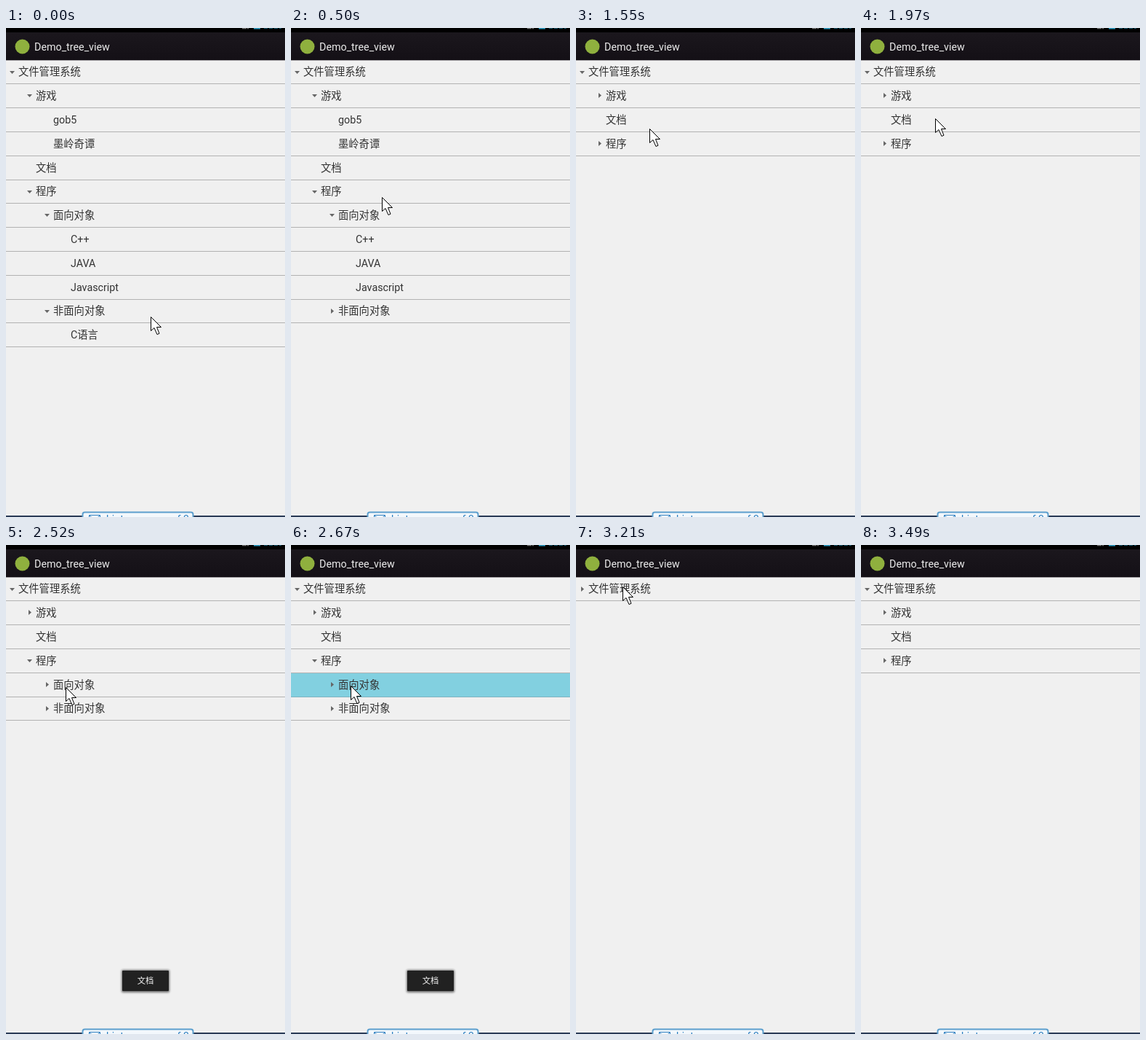
These frames come from a looping animation (384x671 px, 3890 ms). An HTML page:

```html
<!DOCTYPE html>
<html lang="zh-CN">
<head>
<meta charset="utf-8">
<title>Tree view</title>
<style>
html, body { margin: 0; height: 100%; overflow: hidden; background: #f0f0f0; }
svg { display: block; width: 100vw; height: 100vh; }
text { font: 14.3px Roboto, "Noto Sans CJK SC", "Noto Sans CJK", sans-serif; fill: #333; }
</style>
</head>
<body>
<svg viewBox="0 0 384 671">
  <defs>
    <linearGradient id="bar" x2="0" y2="1">
      <stop stop-color="#1b171d"/><stop offset="1" stop-color="#141016"/>
    </linearGradient>
    <filter id="blur"><feGaussianBlur stdDeviation="1.5"/></filter>
  </defs>
  <rect width="384" height="671" fill="#f0f0f0"/>
  <rect width="384" height="7" fill="#000"/>
  <rect y="6" width="384" height="38" fill="url(#bar)"/>
  <rect y="44" width="384" height="1" fill="#a9a7aa"/>
  <path d="M325 .5h9" stroke="#777" stroke-width="1.5" stroke-dasharray="6 1"/>
  <path d="M341 0h9" stroke="#2a9cc4" stroke-width="3"/>
  <path d="M355 .3h24" stroke="#1b6f8e" stroke-dasharray="5 2"/>
  <circle cx="22.5" cy="25.5" r="10" fill="#8fb03e"/>
  <text x="39" y="31" style="fill:#ececec">Demo_tree_view</text>

  <g id="rows"></g>

  <rect y="669" width="384" height="2" fill="#2b3c58"/>
  <rect x="105.5" y="664.5" width="152" height="12" rx="3" fill="#f3f8fc" stroke="#5d9fce" stroke-width="2"/>
  <path d="M114.5 680V668.5H129.5V680M115 669l7 6 7-6" fill="none" stroke="#2e7fc0"/>
  <text x="138" y="679" style="fill:#2e7fc0">hint message of 3</text>

  <g id="toast">
    <rect x="159" y="583" width="66" height="31" rx="2" opacity=".55" filter="url(#blur)"/>
    <rect x="160" y="584" width="64" height="28" rx="1" fill="#212121"/>
    <text x="192" y="602" text-anchor="middle" style="font-size:11.3px;fill:#f4f4f4">文档</text>
  </g>
  <path id="cursor" d="M.5.5V19.5L5 15.5L9 24.5L12 23.2L8.5 14.5H14.5Z" fill="#fff" stroke="#000"/>
</svg>
<script>
const LOOP = 3890, ROW = 32.8, TOP = 44;
const $ = id => document.getElementById(id);

// [level, label]
const tree = [
  [0, "文件管理系统"], [1, "游戏"], [2, "gob5"], [2, "墨岭奇谭"], [1, "文档"],
  [1, "程序"], [2, "面向对象"], [3, "C++"], [3, "JAVA"], [3, "Javascript"],
  [2, "非面向对象"], [3, "C语言"]
];

// [press time, toggle time, node]
const clicks = [
  [200, 300, 10], [700, 780, 5], [1230, 1390, 1], [1850, 1940, 4], [2300, 2400, 5],
  [2620, 2674, 6], [2990, 3090, 5], [3140, 3190, 0], [3290, 3340, 0]
];

// [time, x, y]
const path = [
  [0, 199, 396], [100, 198, 391], [300, 192, 384], [500, 125, 232], [600, 121, 224],
  [860, 117, 220], [1030, 98, 115], [1130, 96, 98], [1390, 96, 96], [1550, 101, 138],
  [1650, 102, 128], [1940, 102, 124], [2210, 92, 156], [2400, 90, 158], [2520, 82, 195],
  [2674, 82, 192], [2782, 72, 150], [2890, 66, 84], [2990, 65, 68], [3140, 64, 57],
  [3440, 64, 57]
];

const steps = [
  [0, 600, 7], [700, 1030, 5], [1130, 1130, 1], [1230, 1550, 5], [1650, 1750, 2],
  [1850, 2300, 6], [2400, 2520, 3], [2620, 2890, 6], [2990, 2990, 1], [3090, 3490, 9]
].flatMap(([a, b, n]) =>
  Array.from({ length: n }, (_, i) => n > 1 ? Math.round(a + (b - a) * i / (n - 1)) : a));

const clamp = v => Math.max(0, Math.min(1, v));

function cursorAt(t) {
  const i = Math.max(1, path.findIndex(p => p[0] >= t));
  const [a, b] = [path[i - 1], path[i]];
  const k = (t - a[0]) / (b[0] - a[0]);
  return [1, 2].map(j => Math.round(a[j] + (b[j] - a[j]) * k));
}

function closedAt(t) {
  const closed = new Set();
  for (const [, at, node] of clicks) {
    if (at > t) break;
    if (closed.delete(node)) continue;
    // Closing a node closes everything below it
    closed.add(node);
    for (let i = node + 1; i < tree.length && tree[i][0] > tree[node][0]; i++) closed.add(i);
  }
  return closed;
}

function rowsAt(t) {
  const closed = closedAt(t);
  const pressed = clicks.find(([a, b]) => a <= t && t < b)?.[2];
  let svg = "", n = 0, limit = 9;
  tree.forEach(([level, label], i) => {
    if (level > limit) return;
    limit = closed.has(i) ? level : 9;
    const top = TOP + ROW * n++, line = Math.floor(top + ROW);
    const x = 24 * level, y = Math.round(top + 16.5);
    if (i === pressed) svg += `<rect y="${Math.floor(top) + 1}" width="384" height="32" fill="#82d0e0"/>`;
    if (tree[i + 1]?.[0] > level) {
      const shape = closed.has(i) ? `M${x + 7} ${y - 4}l4 3.5-4 3.5z` : `M${x + 5} ${y - 2}h7l-3.5 4z`;
      svg += `<path d="${shape}" fill="#666"/>`;
    }
    svg += `<text x="${x + 17}" y="${Math.round(top + 21.4)}">${label}</text>
      <rect y="${line}" width="384" height="1" fill="${i === pressed ? "#7fb4c0" : "#b2b2b2"}"/>`;
  });
  return svg;
}

let shown = -1;
function draw(now) {
  const t = steps.findLast(s => s <= now % LOOP);
  if (t !== shown) {
    shown = t;
    $("rows").innerHTML = rowsAt(t);
    $("toast").setAttribute("opacity", clamp((t - 1940) / 180) * clamp((2836 - t) / 160));
    const visible = t < 3490;
    $("cursor").setAttribute("visibility", visible ? "visible" : "hidden");
    if (visible) $("cursor").setAttribute("transform", `translate(${cursorAt(t)})`);
  }
  requestAnimationFrame(draw);
}
draw(performance.now());
</script>
</body>
</html>
```
